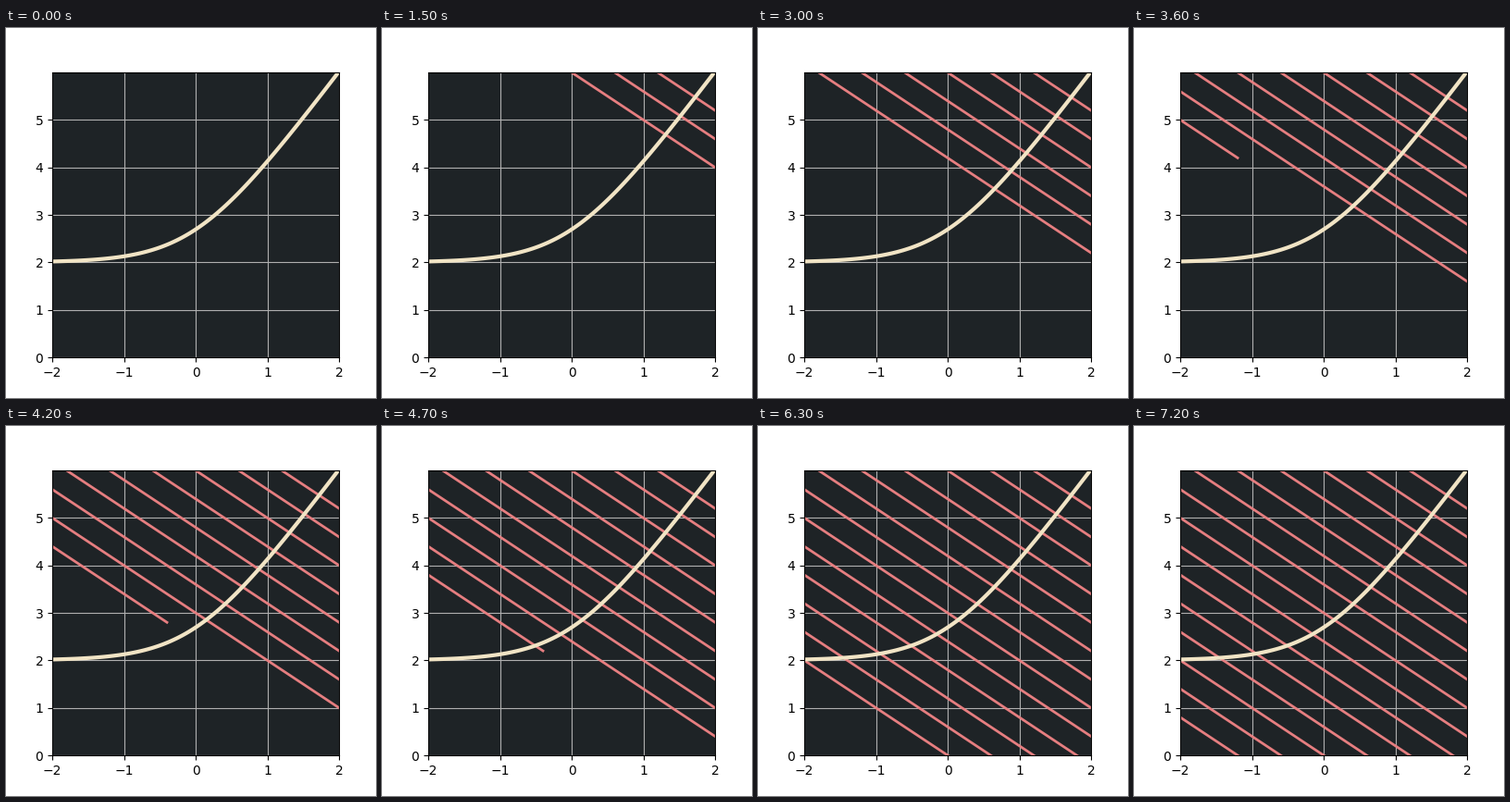
These frames come from a looping animation (400x400 px, 7500 ms). A matplotlib script:

```python
import numpy as np
import matplotlib.pyplot as plt
from matplotlib.animation import FuncAnimation

DARK, CREAM, RED = "#1e2326", "#f1e4c5", "#e67e80"
STEPS = 5    # frames spent drawing each level line
LINES = 15
X0, X1 = -2, 2
TOP, GAP = 7.2, 0.6    # intercept of the first line and spacing

fig, ax = plt.subplots(figsize=(4, 4), dpi=100)
ax.set_facecolor(DARK)
ax.set_xlim(X0, X1)
ax.set_ylim(0, 6)
ax.set_xticks(range(X0, X1 + 1))
ax.set_yticks(range(6))
ax.set_axisbelow(True)
ax.grid(True)

x = np.linspace(X0, X1, 100)
ax.plot(x, 2 + np.log1p(np.exp(2 * x)), color=CREAM, lw=3, zorder=2.2)

levels = [ax.plot([], [], color=RED, lw=2)[0] for _ in range(LINES)]


def update(frame):
    """Sweep the lines x + y = c from left to right, one after another."""
    for i, line in enumerate(levels):
        step = min(max(frame - i * STEPS, 0), STEPS)
        if step == 0:
            line.set_data([], [])
            continue
        c = TOP - GAP * i
        xs = np.array([X0, X0 + (X1 - X0) * step / STEPS])
        line.set_data(xs, c - xs)
    return levels


anim = FuncAnimation(fig, update, frames=LINES * STEPS, interval=100,
                     repeat=True, repeat_delay=0)
plt.show()
```
